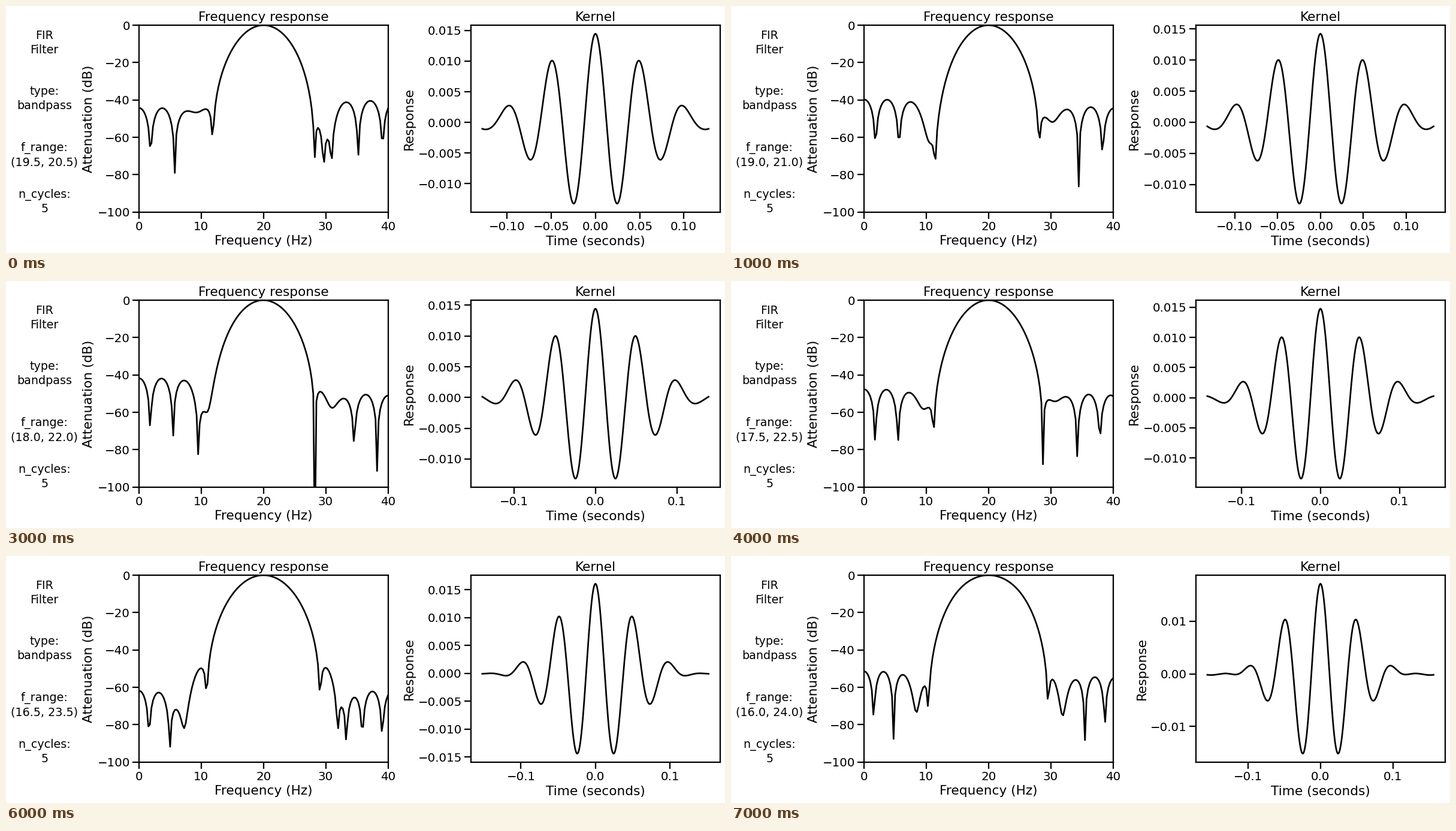
Animation, 1200 px wide and 412 px high, one loop 8 s. Source, as a matplotlib script:

```python
import numpy as np
import matplotlib.pyplot as plt
from matplotlib.animation import FuncAnimation

W, H, DPI = 1200, 412, 100
PX = 72 / DPI  # points per pixel
FS = 1000
N_CYCLES = 5
CENTER = 20

plt.rcParams.update({
    "font.family": "DejaVu Sans",
    "axes.labelsize": 21.7 * PX,
    "axes.titlesize": 21.7 * PX,
    "xtick.labelsize": 19.9 * PX,
    "ytick.labelsize": 19.9 * PX,
    "axes.linewidth": 2.25 * PX,
    "axes.labelpad": 4.8 * PX,
    "axes.titlepad": 7.2 * PX,
    "lines.linewidth": 2.7 * PX,
})
for axis in ("xtick", "ytick"):
    plt.rcParams.update({
        f"{axis}.major.size": 10.8 * PX,
        f"{axis}.major.width": 2.25 * PX,
        f"{axis}.major.pad": 4.2 * PX,
    })


def fir_kernel(lo, hi):
    """Hamming-windowed sinc bandpass, unit gain at the band centre."""
    taps = int(np.ceil(N_CYCLES * FS / lo)) | 1
    t = np.arange(-(taps // 2), taps // 2 + 1) / FS
    ideal = 2 * hi * np.sinc(2 * hi * t) - 2 * lo * np.sinc(2 * lo * t)
    h = ideal * np.hamming(taps)
    return t, h / np.sum(h * np.cos(2 * np.pi * CENTER * t))


def response_db(freqs, t, h):
    gain = np.cos(2 * np.pi * np.outer(freqs, t)) @ h
    return 20 * np.log10(np.abs(gain) + 1e-12)


def add_panel(left, title, xlabel, ylabel):
    top, width, height = 32, 415.5, 311.7
    ax = fig.add_axes([left / W, 1 - (top + height) / H, width / W, height / H])
    ax.set(title=title, xlabel=xlabel, ylabel=ylabel)
    line, = ax.plot([], [], color="black")
    return ax, line


def add_label(text, baseline):
    return fig.text(64.3 / W, 1 - baseline / H, text, ha="center",
                    va="baseline", fontsize=19.1 * PX)


fig = plt.figure(figsize=(W / DPI, H / DPI), dpi=DPI, facecolor="white")

ax_freq, freq_line = add_panel(222, "Frequency response",
                               "Frequency (Hz)", "Attenuation (dB)")
ax_freq.set(xlim=(0, 40), ylim=(-100, 0))
ax_freq.set_xticks(range(0, 41, 10))
ax_freq.set_yticks(range(-100, 1, 20))

ax_kern, kern_line = add_panel(776, "Kernel", "Time (seconds)", "Response")
ax_kern.locator_params(axis="x", nbins=6)
ax_kern.locator_params(axis="y", nbins=7)

for base, head, value in [(79.2, "FIR", "Filter"),
                          (172.4, "type:", "bandpass"),
                          (266.1, "f_range:", ""),
                          (344.2, "n_cycles:", str(N_CYCLES))]:
    add_label(head, base - 24)
    if value:
        add_label(value, base)
range_label = add_label("", 266.1)

freqs = np.arange(0, 41, 0.25)


def update(i):
    half = 0.5 * (i + 1)
    lo, hi = CENTER - half, CENTER + half
    t, h = fir_kernel(lo, hi)
    freq_line.set_data(freqs, response_db(freqs, t, h))
    kern_line.set_data(t, h)
    ax_kern.relim()
    ax_kern.autoscale_view()
    range_label.set_text(f"({lo}, {hi})")
    return freq_line, kern_line, range_label


anim = FuncAnimation(fig, update, frames=8, interval=1000,
                     init_func=lambda: update(0), repeat=True, repeat_delay=0)
plt.show()
```
